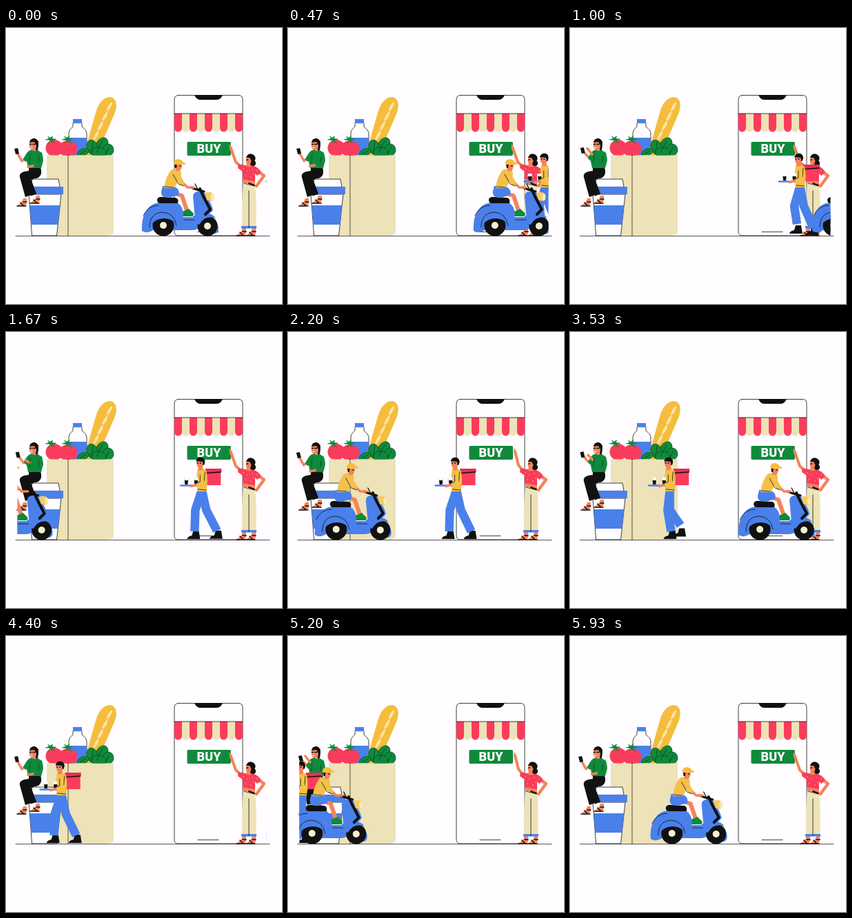
Write an HTML page with a canvas that moves like this. It is 400 by 400 pixels and loops after 6 s.

```html
<!DOCTYPE html>
<html lang="en">
<head>
<meta charset="utf-8">
<style>
html, body { margin: 0; width: 100%; height: 100%; overflow: hidden; background: #fffdff }
canvas { display: block; width: 400px; height: 400px }
</style>
</head>
<body>
<canvas id="stage"></canvas>
<script>
const LOOP = 6000, STEP = LOOP / 90;
const INK = '#111', BLUE = '#4a80ea', GREEN = '#0f8a3c', RED = '#fa3c5c', SAND = '#ede2b8',
  GOLD = '#f5bd3d', SHIRT = '#f4c04a', SKIN = '#f4835c', WHITE = '#fffdff';
const canvas = document.getElementById('stage'), ctx = canvas.getContext('2d');
const ratio = window.devicePixelRatio || 1;
canvas.width = canvas.height = 400 * ratio;

function shape(d, fill, stroke, width = .8) {
  const path = new Path2D(d);
  if (fill) { ctx.fillStyle = fill; ctx.fill(path); }
  if (stroke) { ctx.strokeStyle = stroke; ctx.lineWidth = width; ctx.stroke(path); }
}
const line = (d, color = INK, width = .8) => shape(d, null, color, width);
function oval(x, y, rx, ry, fill, stroke, turn = 0) {
  ctx.beginPath();
  ctx.ellipse(x, y, rx, ry, turn, 0, 7);
  if (fill) { ctx.fillStyle = fill; ctx.fill(); }
  if (stroke) { ctx.strokeStyle = stroke; ctx.lineWidth = .8; ctx.stroke(); }
}
function limb(color, width, points, cap = 'round') {
  ctx.lineCap = cap;
  line('M' + points.join('L'), color, width);
  ctx.lineCap = 'round';
}
function moved(x, draw) {
  ctx.save();
  ctx.translate(x, 0);
  draw();
  ctx.restore();
}
const mix = (a, b, k) => a.map((v, i) => v + (b[i] - v) * k);
const smooth = k => k * k * (3 - 2 * k);

function sandal(x, y) {
  shape(`M${x} ${y}l6 -5 2 -5h5l0 7 -2 4h-11z`, SKIN);
  line(`M${x - 1} ${y + 1}h13M${x + 4} ${y - 4}l4 4M${x + 8} ${y - 5}h5`, INK, 1.6);
}

function groceries() {
  // bottle
  shape('M97 138V143C93 146 91 149 91 154V186H117V154C117 149 114 146 110 143V138Z', WHITE, INK);
  shape('M91 159H117V186H91Z', BLUE);
  shape('M97 132H110V138H97Z', BLUE);
  // bread
  shape('M112 186C118 166 124 143 131 120C135 106 146 97 154 101C162 105 161 117 156 127C149 143 144 157 138 165L132 186Z', GOLD);
  for (let i = 0; i < 4; i++) oval(150 - i * 6.5, 114 + i * 14, 2, 7.5, '#fce5a9', null, .5);
  // tomatoes
  oval(70, 174, 12.5, 12, RED);
  oval(90, 175, 13.5, 12, RED);
  for (const x of [64, 88])
    shape(`M${x} 163l-8 -1 6 -2 -2 -4 4 3 4 -3 -1 4 7 1 -6 2 3 5 -6 -4 -5 5z`, GREEN);
  // greens
  for (const [x, y, rx, ry, a] of [[139, 169, 8, 11, .6], [125, 173, 8, 11, -.3], [148, 177, 8, 9, .2], [112, 180, 9, 5, -.4], [134, 180, 11, 7, 0]])
    oval(x, y, rx, ry, GREEN, '#0a4e25', a);
  line('M140 164L131 181M126 165L124 181M150 172L144 183M107 183L116 178', '#083d1d');
  // bag
  shape('M59 184C75 185 80 184 90 185C110 183 130 186 156 184V293Q156 301 148 301H73V240L59 225Z', SAND);
  line('M90 184V301', INK, .7);
  // cup
  shape('M33.5 241H80L73.5 301H38Z', WHITE, INK);
  shape('M34.5 257H78.3L75.3 285H36.5Z', BLUE);
  shape('M36 230L38 219H76L78 230Z', WHITE, INK);
  shape('M33 230H83V241H33Z', BLUE);
}

function sitter(k) {
  sandal(17, 257);
  sandal(36, 253);
  limb(INK, 9, [[44, 212], [31, 218], [40, 242]], 'butt');
  shape('M33 201L50 202C53 211 50 217 43 218L30 217L36 242L28 245L20 216C19 210 24 208 33 207Z', INK);
  const far = mix([23, 193], [27, 187], k), grip = mix([16, 181], [20, 180], k);
  const near = mix([49, 198], [39, 192], k), palm = mix([32, 202], [25, 174], k);
  limb(SKIN, 3.5, [[31, 186], far, grip]);
  shape('M35 177Q40 175 46 177Q54 181 54 192L51 203H32L30 193L26 189Q30 180 35 177Z', GREEN);
  limb(GREEN, 7, [[34, 182], mix([29, 190], [31, 187], k)]);
  limb(SKIN, 3.5, [near, palm]);
  limb(GREEN, 7, [[49, 183], near, mix(near, palm, .3)]);
  line('M35 183L34 196M48 186L47 195', '#07451f');
  const [px, py] = mix([15, 179], [18, 178], k);
  shape(`M${px - 3} ${py - 4}l5 -1 2 8 -5 1z`, INK);
  // head
  shape('M34 166Q35 159 42 160Q48 162 47 170L46 177H40L37 169Z', INK);
  shape('M34 166L41 165L44 170L43 178Q39 179 38 176Q35 176 34 172Z', SKIN);
  line('M34.5 168.5H36.5M39 168.5H42', INK, 1.6);
  line('M36 173H38', WHITE, 1);
}

function phone() {
  shape('M250 97.5H337Q343 97.5 343 104V295Q343 301 337 301H250Q244 301 244 295V104Q244 97.5 250 97.5Z', WHITE, INK, .8);
  shape('M273 97H314Q311 104 306 104H281Q276 104 273 97Z', INK);
  for (let i = 0; i < 9; i++)
    shape(`M${244 + i * 11} 124h11v21a5.5 5.5 0 0 1 -11 0z`, i % 2 ? SAND : RED);
  line('M244 124H343');
  shape('M264 165H324Q326 165 326 167V183Q326 185 324 185H264Q262.5 185 262.5 183V167Q262.5 165 264 165Z', GREEN);
  ctx.fillStyle = WHITE;
  ctx.font = '900 18px Roboto, sans-serif';
  ctx.textAlign = 'center';
  ctx.fillText('BUY', 294, 181.3);
  line('M278 295.5H308');
}

function shopper(k) {
  sandal(335, 300);
  sandal(349, 300);
  shape('M344 217H361V230H344Z', SKIN);
  shape('M344 224L361 227Q364 255 362 289H342Q341 250 344 224Z', SAND);
  shape('M341 287H363V290.5H341Z', BLUE);
  line('M352 236V289M345 225L360 229');
  line('M352 225L360 228', INK, 2);
  const hand = mix([325.5, 173], [329, 173], k), elbow = mix([333, 194], [334, 193], k);
  limb(SKIN, 4, [[343, 204], elbow, hand]);
  limb(SKIN, 2, [hand, [hand[0] - 1, hand[1] - 3]]);
  limb(SKIN, 4.5, [[364, 207], [374, 214], [363, 229]]);
  shape('M337 197L346 199L359 200Q366 202 370 209L364 214L361 211V222L343 219V208L336 203Z', RED);
  for (const [x, y] of [[344, 204], [350, 207], [357, 205], [347, 214], [355, 216], [364, 207], [359, 212]])
    oval(x, y, .8, .8, '#ffb25c');
  shape('M349 193H356V200Q352 203 348 200Z', SKIN);
  oval(355, 189, 6.5, 6.5, INK);
  oval(358, 196, 4, 4, INK);
  oval(351.5, 192, 4, 5.5, SKIN);
  shape('M348 188Q350 181 357 183L356 193L353 188Z', INK);
  line('M349 191H350.5', INK, 1.4);
}

function walker(t) {
  const angle = (t - 2200) / 550 * Math.PI;
  const leg = a => {
    const lift = 9 * Math.max(0, -Math.sin(a)), y = 300 - lift;
    const x = 247 - 16 * Math.cos(a) + lift * .7;
    shape(`M${x - 9} ${y + lift * .6}q1 -4 7 -5l2 -7h8l2 12z`, INK);
    limb(BLUE, 12.5, [[243.5, 229], [(243 + x) / 2 - 3 - lift * .4, 258], [x + 2, y - 11]], 'butt');
  };
  shape('M249 198H271V222H247Z', RED);
  shape('M249 198H272V203H248Z', '#e92e50');
  line('M250 204.5L271 203', INK, 1.3);
  leg(angle + Math.PI);
  leg(angle);
  shape('M237 199Q245 196 250 201Q253 215 250 231H237Q235 212 237 199Z', SHIRT);
  line('M238 228L250 229M248 203L247 216');
  // tray
  shape('M218 212H224L223 221H219ZM232 212H238L237 221H233Z', INK);
  shape('M218 211H224V215H218ZM232 211H238V215H232Z', WHITE);
  limb(BLUE, 2.5, [[213, 222.5], [236, 222.5]]);
  limb(SKIN, 3.5, [[241, 220], [228, 223.5]]);
  limb(SHIRT, 6, [[243, 205], [244, 220], [239, 221]]);
  line('M241 207L241 217L236 219');
  shape('M239 192H245V199Q241 202 238 199Z', SKIN);
  oval(242, 188, 6, 6, INK);
  oval(240.5, 191, 4.5, 6, SKIN);
  shape('M235 187Q237 181 244 182Q249 184 247 193L244 188Z', INK);
  line('M237 190H238M241 190H242', INK, 1.4);
}

function wheel(x, y, r) {
  oval(x, y, r, r, INK);
  oval(x, y, 5, 5, '#f6efd6');
}

function scooter() {
  shape('M240 272H285V291H243Z', BLUE);
  shape('M281 270Q306 270 308 290Q308 298 302 298L278 285Z', BLUE);
  shape('M197 294Q196 271 207 260Q214 253 224 253H248Q257 258 257 271Q258 277 266 277H274L271 244Q271 238 278 237H287Q296 250 300 263Q298 270 286 271L281 286Q279 293 270 293H213Q205 299 197 294Z', BLUE);
  wheel(228, 286, 15.5);
  shape('M212 283Q213 269 229 268Q244 269 246 283Q239 276 229 276Q219 276 212 283Z', BLUE);
  line('M208 289Q208 268 227 267Q244 268 247 286M199 272Q206 257 221 257M258 278H273');
  wheel(292, 287, 14.5);
  shape('M275 283Q277 270 290 268Q300 269 304 276Q289 270 280 285Z', BLUE);
  // seat
  shape('M219 249Q220 244 228 245L246 246Q251 248 249 254H224Q219 254 219 249Z', INK);
  // steering column
  limb(INK, 4, [[281, 233], [286, 244], [296, 263], [289, 270]]);
  limb(INK, 3, [[268, 231], [276, 234], [287, 237]]);
  limb(INK, 1.3, [[279, 236], [274, 226]]);
  shape('M288 239Q296 236 300 240Q303 245 300 250Q296 252 291 249Z', '#f4cc65');
  oval(299, 245, 2.4, 5, '#fbe8b5');
}

function rider() {
  limb(SKIN, 6, [[242, 239], [255, 243], [262, 264]]);
  shape('M256 266L265 262L272 269Q272 273 267 273H257Z', GREEN);
  line('M257 273.5H271', WHITE, 1);
  shape('M227 229H243Q253 234 250 242L236 246Q224 246 225 237Z', BLUE);
  limb(BLUE, 9, [[235, 237], [245, 239]]);
  shape('M239 206Q246 202 253 207Q256 214 250 221L244 232H229Q231 216 239 206Z', SHIRT);
  limb(SKIN, 3.5, [[256, 224], [263, 231], [272, 231]]);
  limb(SHIRT, 7, [[248, 212], [255, 225]]);
  line('M242 212L250 226L258 229M230 230L243 231');
  shape('M246 199H253V206Q249 209 246 206Z', SKIN);
  oval(250, 200, 5, 6.5, SKIN);
  shape('M244 196H248L247 203H245Z', INK);
  shape('M243 197Q243 190 250 190Q256 191 257 195L261 196L259 198H244Z', GOLD);
  line('M252 200H253', INK, 1.4);
}

function draw(t) {
  ctx.setTransform(ratio, 0, 0, ratio, 0, 0);
  ctx.lineCap = ctx.lineJoin = 'round';
  ctx.fillStyle = WHITE;
  ctx.fillRect(0, 0, 400, 400);

  const pose = smooth(.5 - .5 * Math.cos((t - 200) / 1000 * Math.PI));
  const release = smooth(Math.max(0, 1 - Math.abs(t % 3000 - 2200) / 500));
  groceries();
  sitter(pose);
  phone();
  shopper(release);
  line('M14 301.5H382', INK, .7);

  ctx.save();
  ctx.beginPath();
  ctx.rect(16.5, 90, 361, 215);
  ctx.clip();
  moved(90 - .0745 * (t - 1000), () => walker(t));
  moved((.154 * t + 300) % 497 - 300, () => { scooter(); rider(); });
  ctx.restore();
}

function tick() {
  // steps begin on times rounded to 10 ms, so allow a few ms early
  const step = Math.floor((performance.now() + 4) / STEP) % 90;
  draw(step * STEP);
  requestAnimationFrame(tick);
}
tick();
</script>
</body>
</html>
```
